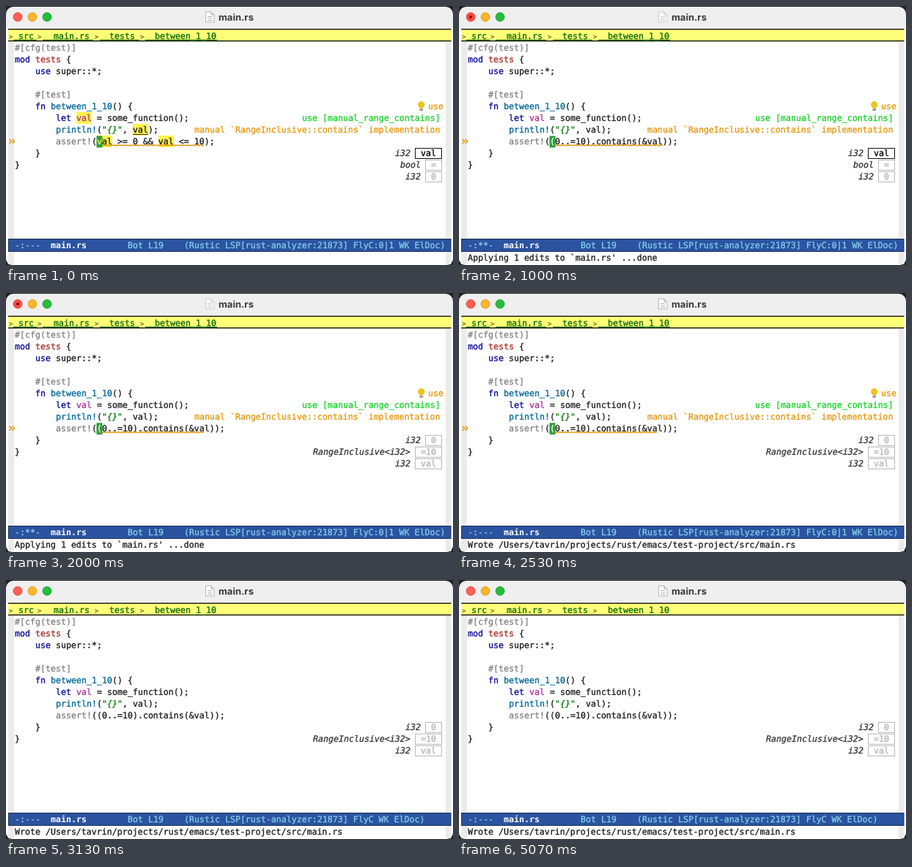
Recreate the animation shown at these times as an HTML page. Size 610 px wide and 354 px high, loop 5.47 s.

```html
<!DOCTYPE html>
<html lang="en">
<head>
<meta charset="utf-8">
<title>main.rs</title>
<style>
  html, body { margin: 0; width: 100%; height: 100%; overflow: hidden; background: #fff; }
  svg { display: block; width: 610px; height: 354px; }
  text { white-space: pre; text-rendering: geometricPrecision; stroke-width: .3;
         font: 11.627px "DejaVu Sans Mono", "Noto Sans Mono", monospace; }
  .b { font-weight: bold; stroke-width: 0; }
  .i { font-style: italic; }
  .title { font: 700 13px Inter, "Open Sans", sans-serif; stroke-width: 0; }
  .arrow { font-size: 9px; }
</style>
</head>
<body>
<svg id="stage" viewBox="0 0 610 354"></svg>
<script>
const LOOP = 5470, CW = 7, LH = 16, LEFT = 12, TOP = 49;
const C = {
  ink: '#1c1c1c', key: '#0a0a96', fn: '#006699', name: '#b0309a', mod: '#a82a22',
  str: '#007a00', pre: '#808080', crumb: '#0a6a0a', warn: '#e4980e', hint: '#18d32a',
  mark: '#fff250', cursor: '#2c9f38', bar: '#2b53a0', barInk: '#85ceeb', fringe: '#ebebeb'
};
const stage = document.getElementById('stage');

const esc = s => s.replace(/&/g, '&amp;').replace(/</g, '&lt;');
const rect = (x, y, w, h, fill, more = '') =>
  `<rect x="${x}" y="${y}" width="${w}" height="${h}" fill="${fill}" ${more}/>`;
const dot = (x, y, r, fill, rim = 'none') =>
  `<circle cx="${x}" cy="${y}" r="${r}" fill="${fill}" stroke="${rim}"/>`;
const text = (x, y, s, fill = C.ink, cls = '') =>
  `<text x="${x}" y="${y}" fill="${fill}" stroke="${fill}" class="${cls}">${esc(s)}</text>`;

const colX = col => LEFT + col * CW;
const rowY = row => TOP + row * LH;
const baseY = row => rowY(row) + 12;
const mark = (col, row, n) => rect(colX(col), rowY(row), n * CW, LH, C.mark);

// A line of code as [text, colour, class] pieces laid out on the character grid.
function line(row, col, ...parts) {
  return parts.map(([s, fill, cls]) => {
    const out = text(colX(col), baseY(row), s, fill, cls);
    col += s.length;
    return out;
  }).join('');
}

const rightText = (right, row, s, fill, cls) =>
  text(right - s.length * CW, baseY(row), s, fill, cls);

function wave(x0, x1, y) {
  let d = `M${x0} ${y}`;
  for (let x = x0 + 2, up = true; x <= x1; x += 2, up = !up) d += `L${x} ${up ? y - 1.2 : y}`;
  return `<path d="${d}" fill="none" stroke="${C.warn}" stroke-width="1.4"/>`;
}

function inlay(row, type, value, active) {
  const w = value.length * CW + 15, x = 594.5 - w, y = rowY(row) + 1.5;
  const ink = active ? '#000' : '#b4b4b4';
  return rect(x, y, w, 14, 'none', `stroke="${active ? '#111' : '#b8b8b8'}"`) +
    text(x + 7.5, baseY(row), value, ink) +
    rightText(x - 6.5, row, type, '#333', 'i');
}

function titleBar(s) {
  return dot(16, 15, 6, s.dirty ? '#fb4a44' : '#fe5f57', '#e8463f') +
    dot(36, 15, 6, '#f9b52c', '#e0a026') + dot(56, 15, 6, '#25bb3c', '#1fa532') +
    (s.dirty ? dot(16, 15, 2, '#7c120c') : '') +
    `<g opacity="${s.dirty ? .55 : 1}" stroke="#a2a2a2" stroke-width=".8" fill="#fff">
      <path d="M272.5 8H280L284 12V22H272.5Z"/><path d="M280 8V12H284" fill="#ddd"/>
      <path d="M275 14.5H281.5M275 17H281.5M275 19.5H281.5"/></g>` +
    text(290, 19.5, 'main.rs', '#3b3b3b', 'title');
}

function frame() {
  return rect(0, 0, 610, 354, '#222') +
    rect(0, 1, 610, 353, '#f0eff0', 'rx="10"') +
    '<path d="M0 31H610V344Q610 354 600 354H10Q0 354 0 344Z" fill="#fff"/>' +
    rect(3, 49, 8, 304, C.fringe) + rect(600, 49, 7.5, 304, C.fringe);
}

function header(s) {
  const crumbs = [[17, 'src', 10, 42], [65, 'main.rs', 50, 119],
                  [141, 'tests', 128, 182], [203, 'between_1_10', 190, 288]];
  return rect(3, 31, 604.5, 17.5, '#ffff78') +
    rect(3, 31, 604.5, 1.5, '#222') + rect(3, 47, 604.5, 1.5, '#222') +
    [4, 43, 121, 183].map(x => text(x, 45, '>', '#6c6c30', 'arrow')).join('') +
    crumbs.map(([x, name, a, b]) => text(x, 45, name, C.crumb) +
      (s.crumbLine ? rect(a, 46, b - a, 1, C.crumb) : '')).join('');
}

function code(s) {
  const marks = s.edited ? '' :
    mark(12, 6, 3) + mark(23, 7, 3) + rect(colX(23), rowY(7) + 14, 21, 1, '#333') +
    mark(16, 8, 3) + mark(28, 8, 3);
  const arg = s.edited ? '(0..=10).contains(&val)' : 'val >= 0 && val <= 10';
  return marks +
    line(0, 0, ['#[cfg(test)]', C.pre]) +
    line(1, 0, ['mod', C.key], [' '], ['tests', C.mod], [' {']) +
    line(2, 4, ['use', C.key], [' super::*;']) +
    line(4, 4, ['#[test]', C.pre]) +
    line(5, 4, ['fn', C.key], [' '], ['between_1_10', C.fn], ['() {']) +
    line(6, 8, ['let', C.key], [' '], ['val', C.name], [' = some_function();']) +
    line(7, 8, ['println!', C.fn], ['('], ['"{}"', C.str, 'i'], [', val);']) +
    line(8, 8, ['assert!', C.pre], ['(' + arg + ');']) +
    line(9, 4, ['}']) + line(10, 0, ['}']) +
    (s.lint ? wave(124, s.waveEnd, 191) : '') +
    (s.cursor ? rect(123.5, rowY(8) + .5, CW + 1, LH, C.cursor, 'rx="1"') +
      text(124, baseY(8), arg[0], s.edited ? '#fff' : C.mark) : '');
}

function lint() {
  return rightText(593, 6, 'use [manual_range_contains]', C.hint) +
    rightText(593, 7, 'manual `RangeInclusive::contains` implementation', C.warn) +
    `<path d="M4.5 182L7.5 185L4.5 188M8.5 182L11.5 185L8.5 188" fill="none" stroke="${C.warn}" stroke-width="1.6"/>`;
}

function bulb() {
  return '<path d="M564.5 140C564.5 138 562 137.5 562 135A4.7 4.7 0 0 1 571.4 135C571.4 137.5 569 138 569 140Z" fill="#ecc41c"/>' +
    rect(564.5, 140.5, 4.5, 2.5, '#8c8c8c') + text(576, baseY(5), 'use', C.warn);
}

function inlays(s) {
  return s.newInlays
    ? inlay(9, 'i32', '0') + inlay(10, 'RangeInclusive<i32>', '=10') + inlay(11, 'i32', 'val')
    : inlay(9, 'i32', 'val', true) + inlay(10, 'bool', '=') + inlay(11, 'i32', '0');
}

function modeLine(s) {
  const put = (col, str, fill = C.barInk, cls) => text(colX(col), 331, str, fill, cls);
  return rect(3.5, 318.5, 603.5, 17, C.bar, 'stroke="#1a2f54"') +
    put(0, s.dirty ? '-:**-' : '-:---') + put(7, 'main.rs', '#fff', 'b') +
    put(22, 'Bot L19') +
    put(33, `(Rustic LSP[rust-analyzer:21873] FlyC${s.lint ? ':0|1' : ''} WK ElDoc)`);
}

function echoArea(t) {
  if (t < 470) return '';
  if (t < 1000) return 'C-c C-c-';
  if (t < 2470) return 'Applying 1 edits to `main.rs\' ...done';
  return 'Wrote /Users/tavrin/projects/rust/emacs/test-project/src/main.rs';
}

const cursorOn = [[0, 400], [870, 1470], [2000, 3070], [3530, 4000], [4530, 5070]];

function stateAt(t) {
  return {
    cursor: cursorOn.some(([a, b]) => t >= a && t < b),
    edited: t >= 1000,
    dirty: t >= 1000 && t < 2530,
    newInlays: t >= 1270,
    waveEnd: t >= 1000 && t < 1470 ? 279 : 271,
    bulb: t < 2730,
    lint: t < 3070,
    crumbLine: t < 3130,
    echo: echoArea(t)
  };
}

let shown = '';
function draw(t) {
  const s = stateAt(t), key = JSON.stringify(s);
  if (key === shown) return;
  shown = key;
  stage.innerHTML = frame() + titleBar(s) + header(s) + code(s) +
    (s.lint ? lint() : '') + (s.bulb ? bulb() : '') +
    inlays(s) + modeLine(s) + text(LEFT, 348, s.echo);
}

const start = performance.now();
function tick() {
  draw((performance.now() - start) % LOOP);
  requestAnimationFrame(tick);
}
tick();
</script>
</body>
</html>
```
